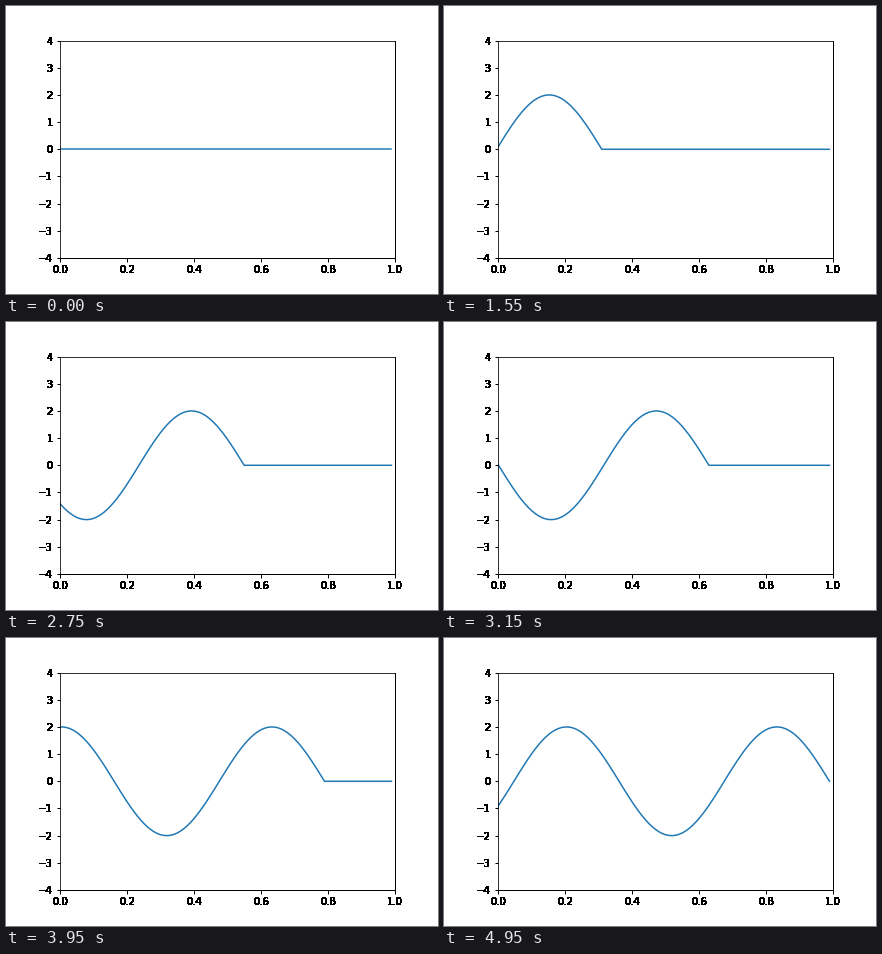
These frames come from a looping animation (432 by 288 pixels, 5000 ms). A matplotlib script:

```python
import numpy as np
import matplotlib.pyplot as plt
from matplotlib.animation import FuncAnimation

STEPS = 100
INTERVAL = 50       # ms
AMPLITUDE = 2
OMEGA = 10
DX = 0.01           # the wave advances one cell per step


def solid(img, dpi):
    """Make every partly covered pixel fully opaque, for crisp labels."""
    out = img.copy()
    out[..., :3] = 0
    out[..., 3] = img[..., 3] > 0
    return out, 0, 0


def wave(step):
    """Sine wave driven at the left end, zero ahead of its front."""
    lag = np.maximum(step - np.arange(STEPS), 0) * DX
    return AMPLITUDE * np.sin(OMEGA * lag)


fig = plt.figure(figsize=(6, 4), dpi=72)
ax = fig.add_axes([0.125, 0.125, 0.775, 0.755])
ax.set(xlim=(0, 1), ylim=(-4, 4))
ax.set_xticks(np.linspace(0, 1, 6))
ax.set_yticks(np.arange(-4, 5))
ax.tick_params(width=1)
for side in ("right", "bottom"):
    ax.spines[side].set_linewidth(1)
for label in ax.get_xticklabels() + ax.get_yticklabels():
    label.set_agg_filter(solid)

x = np.arange(STEPS) * DX
line, = ax.plot(x, wave(0), color="#1f77b4", lw=1.5)


def update(step):
    line.set_ydata(wave(step))
    return line,


anim = FuncAnimation(fig, update, frames=STEPS, interval=INTERVAL,
                     repeat=True, repeat_delay=0, blit=False)
plt.show()
```
